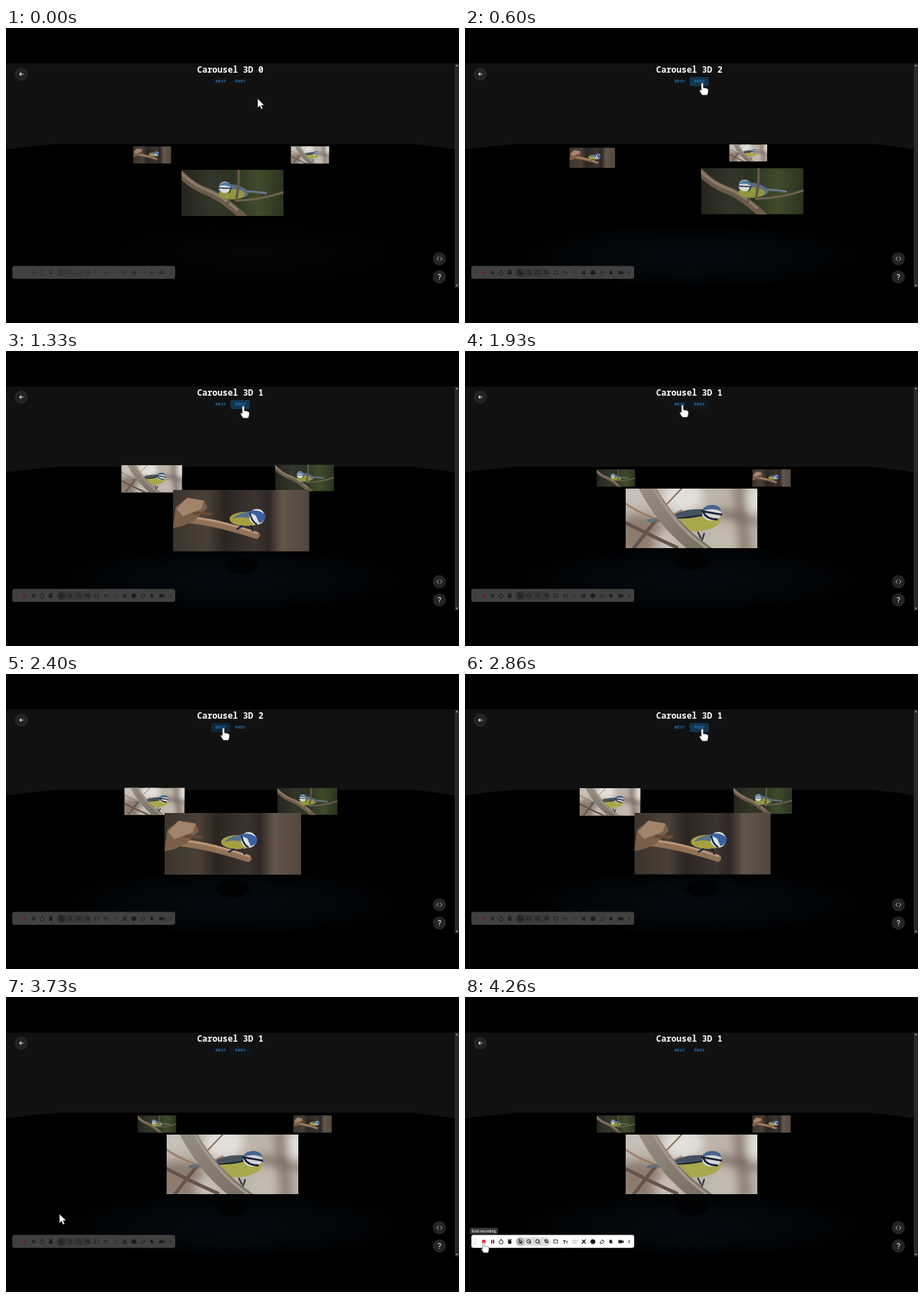
Animation of 640 by 416 pixels, one loop 4330 ms. Source, as an HTML page:

```html
<!DOCTYPE html>
<html lang="en">
<head>
<meta charset="utf-8">
<title>Carousel 3D</title>
<style>
  html, body { margin: 0; height: 100%; overflow: hidden; background: #000; }
  svg { display: block; width: 640px; height: 416px; }
  .title { font: bold 12px "Noto Sans Mono", monospace; fill: #fff; }
  .label { font: bold 5.8px "Noto Sans Mono", monospace; letter-spacing: .25px; fill: #2474b3; }
  .tip { font: 5.4px "Liberation Sans", sans-serif; fill: #fff; }
  .line { fill: none; stroke-linecap: round; stroke-linejoin: round; }
</style>
</head>
<body>
<svg viewBox="0 0 640 416">
  <defs>
    <clipPath id="photo"><rect width="193" height="87"/></clipPath>
    <filter id="soft" x="-50%" y="-50%" width="200%" height="200%"><feGaussianBlur stdDeviation="7"/></filter>
    <radialGradient id="blue"><stop stop-color="#040a10"/><stop offset=".5" stop-color="#03070b"/><stop offset="1" stop-color="#000"/></radialGradient>
    <radialGradient id="gray"><stop stop-color="#060606"/><stop offset="1" stop-color="#000"/></radialGradient>
    <linearGradient id="leaves">
      <stop stop-color="#25241d"/><stop offset=".3" stop-color="#33362a"/><stop offset=".5" stop-color="#2c3422"/>
      <stop offset=".75" stop-color="#404b2c"/><stop offset="1" stop-color="#2a3420"/>
    </linearGradient>
    <linearGradient id="wood">
      <stop stop-color="#3c342c"/><stop offset=".25" stop-color="#4a4037"/><stop offset=".38" stop-color="#2b2521"/>
      <stop offset=".6" stop-color="#3d342f"/><stop offset=".7" stop-color="#2e2725"/><stop offset=".8" stop-color="#64564b"/><stop offset="1" stop-color="#51463e"/>
    </linearGradient>
    <linearGradient id="bark" x2="1" y2="1"><stop stop-color="#968c80"/><stop offset="1" stop-color="#746a60"/></linearGradient>
  </defs>

  <!-- room -->
  <path d="M0 50H634V171Q604 166.3 570 163.3H75Q38 166.3 0 171Z" fill="#111"/>
  <ellipse cx="350" cy="318" rx="230" ry="46" fill="url(#gray)"/>
  <ellipse id="glow" cx="320" cy="322" rx="250" ry="48" fill="url(#blue)"/>
  <g id="shadows"><ellipse/><ellipse/><ellipse/></g>
  <path d="M634 50h6v316h-6z" fill="#292929"/>
  <path d="M635.5 54l1.5-2.5 1.5 2.5zM635.5 362l1.5 2.5 1.5-2.5z" fill="#aaa"/>

  <g id="ring">
    <g><g clip-path="url(#photo)">
      <path d="M0 0h193v87H0z" fill="url(#leaves)"/>
      <g class="line">
        <path d="M-4 6Q22 32 48 41T118 90" stroke="#6b5b4b" stroke-width="14"/>
        <path d="M-4 3Q22 29 48 38T105 75" stroke="#8a7966" stroke-width="5"/>
        <path d="M103 58Q150 57 194 42" stroke="#6d614f" stroke-width="4"/>
        <path d="M118 40Q140 41 160 44" stroke="#68788a" stroke-width="4"/>
      </g>
      <ellipse cx="98" cy="40" rx="29" ry="12" transform="rotate(10 98 40)" fill="#586c80"/>
      <ellipse cx="95" cy="46" rx="25" ry="10" fill="#929640"/>
      <circle cx="82" cy="33" r="11" fill="#d5dadb"/>
      <path d="M71 31Q76 20 91 25L95 34Q84 27 71 31Z" fill="#5078a4"/>
      <path d="M70 34L94 35 90 43" class="line" stroke="#1f2a3c" stroke-width="2"/>
      <path d="M108 0Q110 25 104 53M90 58l-4 8" class="line" stroke="#64574a" stroke-width="5"/>
    </g></g>
    <g><g clip-path="url(#photo)">
      <path d="M0 0h193v87H0z" fill="#bcb3a9"/>
      <g filter="url(#soft)">
        <ellipse cx="20" cy="68" rx="38" ry="30" fill="#8b7c70"/>
        <ellipse cx="15" cy="10" rx="24" ry="16" fill="#c7c1b9"/>
        <ellipse cx="84" cy="12" rx="30" ry="24" fill="#e2dfda"/>
        <ellipse cx="58" cy="76" rx="16" ry="14" fill="#c9c1b8"/>
        <ellipse cx="146" cy="74" rx="26" ry="18" fill="#c4bbb0"/>
        <path d="M132 -10H158L166 95H184L172 -10Z" fill="#87796e"/>
        <ellipse cx="191" cy="16" rx="12" ry="24" fill="#e4e1dc"/>
        <path d="M135 30L200 42V51L135 40Z" fill="#6b5d54"/>
      </g>
      <g class="line">
        <path d="M0 22Q25 40 70 52M0 72L82 32" stroke="#99765f" stroke-width="3" opacity=".8"/>
        <path d="M82 0L55 28" stroke="#82684e" stroke-width="2"/>
        <path d="M0 50Q35 68 75 86M12 87L44 46" stroke="#65544a" stroke-width="5"/>
        <path d="M34 47Q55 45 75 41" stroke="#606f7b" stroke-width="5"/>
      </g>
      <ellipse cx="108" cy="48" rx="32" ry="14" transform="rotate(-7 108 48)" fill="#a8a84c"/>
      <path d="M64 44Q78 29 112 30L118 38Q102 42 76 41Z" fill="#44525f"/>
      <path d="M72 43Q96 43 116 38" class="line" stroke="#1e2630" stroke-width="2.5"/>
      <ellipse cx="126" cy="36" rx="14" ry="11" fill="#d5d7d8"/>
      <path d="M111 33Q116 23 130 24 140 26 140 33 127 27 111 33Z" fill="#48668e"/>
      <path d="M112 33L140 38M114 35Q119 45 134 45" class="line" stroke="#1b2433" stroke-width="3"/>
      <path d="M28 -8Q46 26 66 49T122 98" class="line" stroke="url(#bark)" stroke-width="23"/>
      <path d="M36 -8Q56 26 76 49T126 92" class="line" stroke="#a2978b" stroke-width="4"/>
      <path d="M106 64l4 8M115 66l-3 9" class="line" stroke="#353a43" stroke-width="2.5"/>
    </g></g>
    <g><g clip-path="url(#photo)">
      <path d="M0 0h193v87H0z" fill="url(#wood)"/>
      <g class="line">
        <path d="M22 42Q58 45 118 64" stroke="#917256" stroke-width="10"/>
        <path d="M25 39Q60 41 119 61" stroke="#ba967a" stroke-width="3"/>
      </g>
      <path d="M0 54L4 24 20 11 44 15 49 25 31 43 14 51Z" fill="#7a5f49"/>
      <path d="M5 27L20 11 44 15 40 27 14 37Z" fill="#a2846a"/>
      <path d="M30 33L53 34" class="line" stroke="#674a36" stroke-width="4"/>
      <ellipse cx="104" cy="41" rx="24" ry="10" fill="#a69f42"/>
      <path d="M84 41Q96 28 122 31L114 42Q100 36 84 41Z" fill="#56728a"/>
      <circle cx="119" cy="38" r="11" fill="#dde3e8"/>
      <path d="M106 31Q121 25 131 36 132 44 122 47L117 36Z" fill="#3b60a2"/>
      <path d="M109 33Q111 44 118 48M98 51l-7 4M110 51l3 7" class="line" stroke="#1d2b48" stroke-width="2.5"/>
    </g></g>
  </g>

  <!-- page controls -->
  <text id="title" class="title" x="270" y="63" xml:space="preserve"></text>
  <rect id="next" x="290" y="69" width="27" height="13" rx="2" fill="#123650"/>
  <rect id="prev" x="317.5" y="69" width="27" height="13" rx="2" fill="#123650"/>
  <text class="label" x="296.2" y="77">NEXT</text>
  <text class="label" x="323.5" y="77">PREV</text>
  <g fill="#242424"><circle cx="21.5" cy="65" r="9.3"/><circle cx="612.3" cy="325.3" r="9.3"/><circle cx="612.3" cy="351" r="9.3"/></g>
  <path d="M24.3 65h-5m2-1.9l-2 1.9 2 1.9" class="line" stroke="#ddd" stroke-width="1.1"/>
  <path d="M611 323l-2.4 2.3 2.4 2.3M613.7 323l2.4 2.3-2.4 2.3" class="line" stroke="#ccc" stroke-width=".9"/>
  <text x="612.3" y="354.8" text-anchor="middle" font-family="Roboto, sans-serif" font-size="11" fill="#eee">?</text>

  <!-- recorder bar -->
  <rect id="bar" x="9" y="335.5" width="230" height="18.3" rx="3"/>
  <g id="icons">
    <rect id="pill" x="72" y="339" width="49" height="12" rx="6"/>
    <circle id="pick" cx="78" cy="345" r="6"/>
    <rect id="stop" x="24.2" y="342.6" width="4.8" height="4.8"/>
    <g class="line" stroke="#161616" stroke-width="1">
      <path d="M13 342v.1m0 2.8v.1m0 2.8v.1m2.5-5.9v.1m0 2.8v.1m0 2.8v.1" opacity=".4"/>
      <path d="M37.7 343v4m2.8-4v4" stroke-width="1.5"/>
      <path d="M49 343.5a2.8 2.8 0 1 0 4 0l-2-1.2m0-1.3v2.6"/>
      <path d="M61.5 343.5h3.5v4h-3.5zM60.8 342h5" fill="#161616"/>
      <path d="M76.7 342v5l1.3-1.2 1 2 .8-.5-1-1.8h1.8z"/>
      <circle cx="90" cy="344.6" r="2.6"/><path d="M90 344l3 3.4"/>
      <circle cx="102.5" cy="344.6" r="2.6"/><path d="M104 346l2 2"/>
      <path d="M113 342.5l4 4m-4-1v-3h3m1 1v3h-3"/>
      <path d="M125.5 342.5h5v4.5h-5z" stroke-dasharray="1.5 1.5"/>
      <path d="M153 343h4v4h-4z" opacity=".3"/>
      <path d="M165.5 347.5l4.5-5m-4 .2l4 4.5" stroke-width="1.4"/>
      <circle cx="180.7" cy="345" r="3" fill="#161616"/>
      <path d="M191 345.5l3-3 2.8 2-3.2 3h-1.5z"/>
      <path d="M204 343l4 4.5m-3.7-1.5q0-2 1.7-3.7 2 2 1.7 3.7-1.7 2.2-3.4 0" fill="#161616"/>
      <path d="M217.5 343.2h4v3.6h-4zM222.5 344.5l1.3-.8v2.8l-1.3-.8" fill="#161616"/>
      <path d="M233 343l-2 2 2 2"/>
    </g>
    <text x="138.3" y="347.5" font-family="Liberation Sans, sans-serif" font-weight="bold" font-size="7" fill="#161616">T<tspan font-size="5">T</tspan></text>
  </g>
  <g id="tip">
    <rect x="7" y="325.5" width="39.5" height="8.8" rx="1.5" fill="#3b3b3b"/>
    <text class="tip" x="26.7" y="331.8" text-anchor="middle">End recording</text>
  </g>

  <path id="cursor" fill="#fff" stroke="#111" stroke-width=".5"/>
</svg>

<script>
const LOOP = 4330, TURN = 270;
const $ = id => document.getElementById(id);
const set = (el, attrs) => { for (const k in attrs) el.setAttribute(k, attrs[k]); };
const mix = (a, b, p) => a + (b - a) * p;
const ease = p => { p = Math.min(1, Math.max(0, p)); return p * p * (3 - 2 * p); };

// Resting view per photo: front width, front y, back width, back y, back x spread, back x shift
const views = [
  [144, 232.5, 54, 179, 111.5, -2],
  [186, 236, 54.5, 179.3, 110, 3.3],
  [193, 239.5, 85, 179.6, 108, -2]
];
const turns = [[-LOOP, 0], [540, -1], [1308, -2], [2135, -1], [2835, -2]];
const photoAt = pos => (pos + 3) % 3;

// Keys are [time, value, ...]
const path = [[0, 355.5, 99.5], [390, 335.2, 77.2], [1650, 335.2, 77.2], [1880, 307.2, 76], [2450, 307.2, 76],
  [2740, 335.2, 77.2], [2960, 335.2, 77.2], [3120, 324.7, 104.3], [3300, 324.7, 104.3], [3880, 26.5, 345.5]];
const prevKeys = [[330, 0], [420, .4], [530, .4], [570, 1], [780, .4], [1300, .4], [1330, 1], [1580, .9],
  [1700, .4], [1930, .15], [2100, 0], [2650, 0], [2750, .4], [2860, 1], [3100, .5], [3500, .4], [3870, 0]];
const nextKeys = [[1800, 0], [1930, .08], [2050, .4], [2160, 1], [2400, .6], [2550, .3], [2680, 0]];
const wakeKeys = [[60, 0], [400, 1]];

function track(keys, t) {
  const i = keys.findIndex(k => k[0] > t);
  if (i === 0) return keys[0].slice(1);
  if (i < 0) return keys[keys.length - 1].slice(1);
  const a = keys[i - 1], b = keys[i], p = ease((t - a[0]) / (b[0] - a[0]));
  return a.slice(1).map((v, n) => mix(v, b[n + 1], p));
}

const ring = $('ring'), cards = [...ring.children], shadows = [...$('shadows').children];
const ARROW = 'M0 0V13L3 10.2 5.2 15 7.5 14 5.3 9.4H9.5Z';
const HAND = 'M-1.5 1Q0-1 1.5 1V7Q6 7 8.5 9V13Q8 15 7 17.5H0Q-3 14-4 11-3 9-1.5 11Z';

function drawRing(t) {
  const n = turns.filter(k => k[0] <= t).length - 1;
  const [start, to] = turns[n], from = n ? turns[n - 1][1] : to;
  const p = ease((t - start) / TURN), pos = mix(from, to, p);
  const [wf, yf, wb, yb, spread, shift] =
    views[photoAt(from)].map((v, i) => mix(v, views[photoAt(to)][i], p));
  $('title').textContent = 'Carousel 3D ' + photoAt(to);

  const placed = cards.map((card, i) => {
    const angle = (i - pos) * Math.PI * 2 / 3;
    const depth = (1 - Math.cos(angle)) / 1.5;
    const w = 1 / mix(1 / wf, 1 / wb, depth);
    const x = 320 + shift * depth + spread * Math.sin(angle) / Math.sin(Math.PI / 3) * w / wb;
    const y = mix(yb, yf, (w - wb) / (wf - wb));
    set(card, { transform: `translate(${x} ${y}) scale(${w / 193}) translate(-96.5 -43.5)` });
    set(shadows[i], { cx: x, cy: y + w * .33, rx: w * .125, ry: w * .06, opacity: .75 });
    return { card, depth };
  });
  placed.sort((a, b) => b.depth - a.depth).forEach(o => ring.append(o.card));
}

function draw(t) {
  drawRing(t);
  const [wake] = track(wakeKeys, t);
  const lit = t >= 3860;
  set($('glow'), { opacity: wake });
  set($('icons'), { opacity: lit ? 1 : mix(.35, .85, wake) });
  set($('bar'), { fill: lit ? '#fff' : '#414141' });
  set($('pill'), { fill: lit ? '#ddd' : '#383838' });
  set($('pick'), { fill: lit ? '#b5b5b5' : '#2b2b2b' });
  set($('stop'), { fill: lit ? '#e5202c' : '#7c1a1e', rx: lit ? 1 : 2.4, opacity: wake });
  set($('tip'), { opacity: t >= 3930 ? 1 : 0 });
  set($('prev'), { opacity: track(prevKeys, t)[0] });
  set($('next'), { opacity: track(nextKeys, t)[0] });

  const [x, y] = track(path, t);
  const hand = t > 360 && t < 3010 || lit;
  set($('cursor'), { d: hand ? HAND : ARROW, transform: `translate(${x} ${y}) scale(${lit ? .87 : 1})` });
}

const begin = performance.now();
function tick() {
  draw((performance.now() - begin) % LOOP);
  requestAnimationFrame(tick);
}
tick();
</script>
</body>
</html>
```
